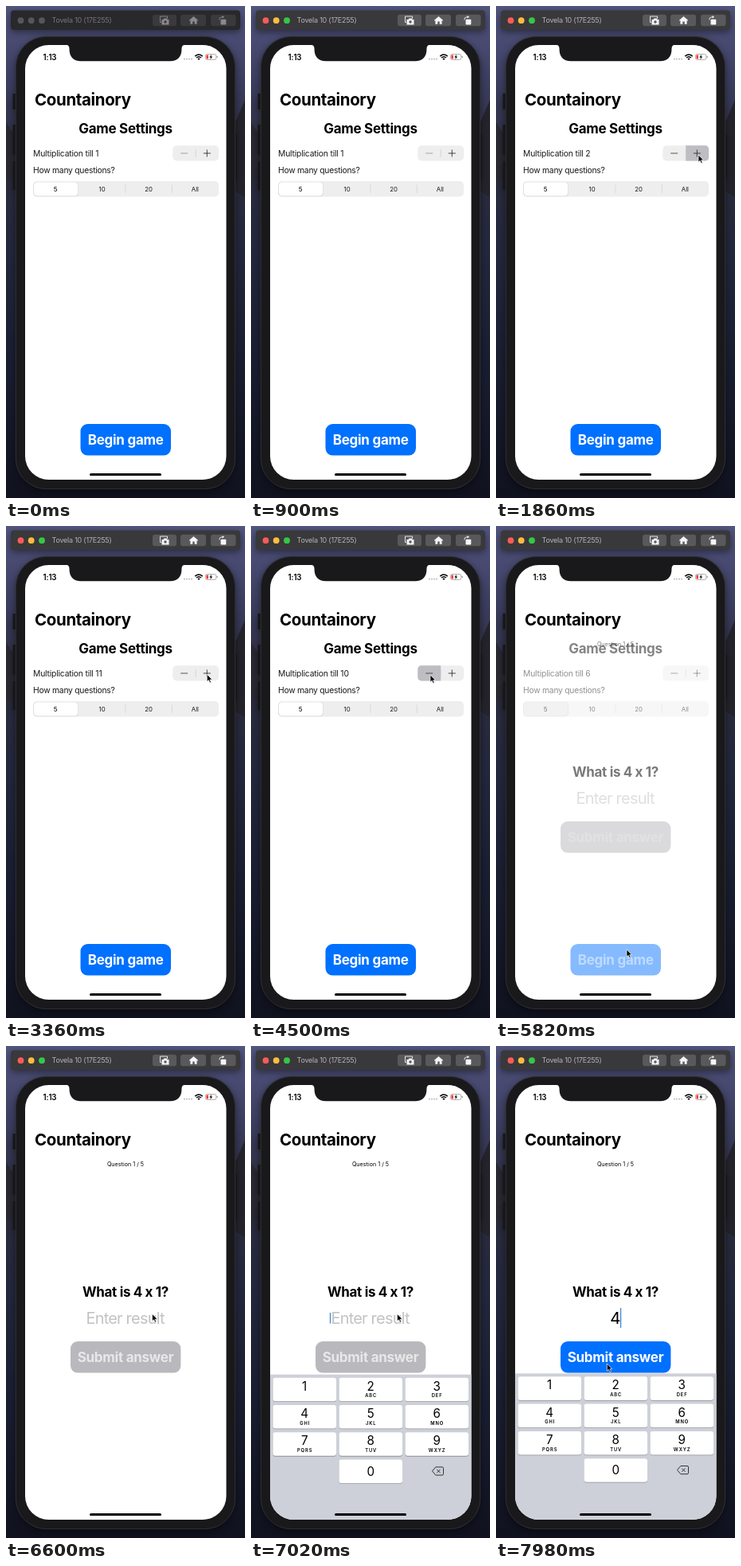
An HTML page that plays this animation: 300 px wide and 618 px high, repeating every 8 s.

```html
<!DOCTYPE html>
<html lang="en">
<head>
<meta charset="utf-8">
<title>Times table game</title>
<style>
html, body { margin: 0; width: 100%; height: 100%; overflow: hidden; background: #171a27; }
svg { display: block; width: 100%; height: 100%; }
text { font-family: Inter, sans-serif; white-space: pre; }
.window { filter: drop-shadow(0 3px 5px rgba(0, 0, 0, .45)); }
</style>
</head>
<body>
<svg id="stage" viewBox="0 0 300 618" preserveAspectRatio="none"></svg>
<script>
const LOOP = 8000;
const BLUE = '#0070ff';
const INK = '#1a1a1c';
const stage = document.getElementById('stage');

const rect = (x, y, w, h, r, fill, more = '') =>
  `<rect x="${x}" y="${y}" width="${w}" height="${h}" rx="${r}" fill="${fill}" ${more}/>`;
const line = (d, color, width = 0.9, more = '') =>
  `<path d="${d}" fill="none" stroke="${color}" stroke-width="${width}" ${more}/>`;
const text = (x, y, size, str, more = '', weight = 400, gap = -0.015) =>
  `<text x="${x}" y="${y}" font-size="${size}" font-weight="${weight}" letter-spacing="${(size * gap).toFixed(3)}" ${more}>${str}</text>`;
const mid = (x, y, size, str, more = '', weight = 400, gap = -0.015) =>
  text(x, y, size, str, `text-anchor="middle" ${more}`, weight, gap);
const fade = (cls, items) => `<g class="${cls}">${items.join('')}</g>`;

function wallpaper() {
  const stops = [[0, '#53567f'], [0.06, '#4a4c74'], [0.15, '#3d3f62'], [0.23, '#34354e'],
    [0.36, '#2a2c3e'], [0.5, '#24283e'], [0.75, '#191d30'], [1, '#10121f']];
  return `<defs>
    <linearGradient id="sky" x2="0" y2="1">${stops.map(([o, c]) => `<stop offset="${o}" stop-color="${c}"/>`).join('')}</linearGradient>
    <clipPath id="glass"><rect x="24" y="49" width="252.5" height="546" rx="29.5"/></clipPath>
  </defs>${rect(0, 0, 300, 618, 0, 'url(#sky)')}
  <path d="M300 118L286 150V232L300 240Z" fill="#25242d"/><path d="M0 146L14 168V216L0 220Z" fill="#2b2932"/>`;
}

function titleBar() {
  const lights = [18.5, 31.7, 45].map(x => `<circle class="light" cx="${x}" cy="18.2" r="3.9"/>`).join('');
  const buttons = [[184, 30], [219, 32], [257, 31.5]]
    .map(([x, w]) => rect(x, 10.8, w, 14.4, 3, '', 'class="tool"')).join('');
  const camera = line('M195 20.500h-1.500v-7.500h9v3', 'currentColor', 0.9) +
    `<path d="M195.5 17h2l1-1.500h3l1 1.500h2v6.500h-9z" fill="currentColor"/><circle class="hole" cx="200" cy="20" r="1.700"/>`;
  const home = `<path d="M235.500 12.900l5.700 5-.7.800-.9-.7v4.700h-2.900v-3.300h-2.400v3.300h-2.900v-4.700l-.9.700-.7-.8z" fill="currentColor"/>`;
  const turn = rect(269.5, 16.8, 6.8, 6.6, 1, 'currentColor') +
    line('M267.800 17.500q-.2-3.600 3.200-3.700h1', 'currentColor', 0.9) + '<path d="M271.500 12l2.600 1.800-2.600 1.800z" fill="currentColor"/>';
  return rect(6, 5.5, 288, 24.5, 4, '', 'id="bar" class="window"') + lights +
    text(57.5, 21.4, 9, 'Tovela 10 (17E255)', 'id="barText"', 400, -0.025) +
    buttons + `<g id="tools">${camera}${home}${turn}</g>`;
}

function phone() {
  const keys = [[110, 20], [149, 38], [195, 36]].map(([y, h]) => rect(8.5, y, 5, h, 1, '#17171b')).join('');
  return `<g class="window">${keys}${rect(285, 160, 5, 58, 1, '#17171b')}` +
    rect(12.4, 38.4, 275.2, 568.2, 38, '#19181a', 'stroke="#313033" stroke-width="1"') + '</g>' +
    rect(24, 49, 252.5, 546, 29.5, '#fff');
}

function statusBar() {
  const dots = [224, 227, 230, 233].map(x => `<circle cx="${x}" cy="66.6" r="0.9" fill="#aaa"/>`).join('');
  const wifi = line('M237.3 63.1q4.7-4.2 9.4 0', '#000', 1.5) + line('M239 65q3-2.6 6 0', '#000', 1.4) +
    '<path d="M240.4 66.2q1.6-1.2 3.2 0l-1.6 1.7z"/>';
  const battery = rect(250.4, 60.6, 13.4, 6.8, 2, 'none', 'stroke="#8c8c8c" stroke-width=".7"') +
    rect(251.4, 61.6, 2.6, 4.8, 0.8, '#ff3b30') + rect(264.7, 62.8, 0.9, 2.4, 0.4, '#8c8c8c') +
    '<path d="M258 60.8l-2.7 3.6h1.7l-.6 2.8 2.7-3.6h-1.7z"/>';
  return '<path d="M75 48.500Q79.500 49 79.500 53.500C79.500 64 84.500 69.300 94 69.300H206C215.500 69.300 220.500 64 220.500 53.500Q220.500 49 225 48.500Z" fill="#19181a"/>' +
    text(46.5, 67.5, 9.7, '1:13', '', 600) + dots + wifi + battery;
}

function settings() {
  const segments = ['5', '10', '20', 'All'].map((s, i) =>
    mid(62.2 + i * 58.4, 232.6, 7.8, s, `fill="${INK}"`, i ? 400 : 500, 0));
  return fade('out', [
    mid(150, 160.2, 17, 'Game Settings', '', 700, -0.018),
    text(34, 188.6, 10.35, '', `id="till" fill="${INK}"`, 400, -0.018),
    text(34, 209.5, 10.35, 'How many questions?', `fill="${INK}"`, 400, -0.025),
    rect(209.3, 175.3, 57.8, 19.2, 5, '#eeeeef'),
    '<path id="minusBg" d="M238.2 175.3h-23.900q-5 0-5 5v9.200q0 5 5 5h23.900z" fill="#bdbdc2"/>',
    '<path id="plusBg" d="M238.2 175.3h23.900q5 0 5 5v9.200q0 5-5 5h-23.900z" fill="#bdbdc2"/>',
    line('M238.2 180v9.800', '#cfcfd2', 0.8),
    line('M219.200 185h9', '#000', 0.9, 'id="minus"'),
    line('M247.800 185h9M252.300 180.500v9', '#000', 0.9, 'id="plus"'),
    rect(34, 220, 233, 19.5, 5, '#eeeeef'),
    rect(34.3, 220.9, 56.6, 18.3, 4.4, '#d4d4d7'),
    rect(34.9, 221.2, 55.4, 17.2, 4.2, '#fff'),
    line('M150 224.500v10.500M208.300 224.500v10.500', '#d3d3d6', 0.7),
    ...segments,
    rect(93.5, 525, 113.5, 39.6, 9, BLUE),
    mid(150.2, 550.6, 17, 'Begin game', 'fill="#fff"', 700)
  ]);
}

function game() {
  return fade('in', [
    mid(150, 151.2, 7.2, 'Question 1 / 5', '', 400, 0),
    mid(150, 314.5, 17, 'What is 4 x 1?', '', 700, -0.02),
    mid(149.6, 349, 20, 'Enter result', 'id="hint" fill="#c3c3c6"', 400, -0.04),
    mid(149.8, 349, 20.5, '4', 'id="typed"', 400, 0),
    rect(81, 371, 138.4, 39.6, 9, BLUE, 'id="submit"'),
    mid(150, 396.8, 17, 'Submit answer', 'id="submitText"', 700)
  ]) + rect(98.9, 335, 1.2, 13.5, 0.3, '#3b82d8', 'id="caret"');
}

function keyboard() {
  const letters = ['', 'ABC', 'DEF', 'GHI', 'JKL', 'MNO', 'PQRS', 'TUV', 'WXYZ'];
  const key = (x, y, digit, sub) => rect(x, y + 0.8, 79.5, 29.6, 3, '#8e9197') +
    rect(x, y, 79.5, 29.6, 3, '#fff', `id="key${digit}"`) +
    mid(x + 39.7, y + (digit ? 16 : 20), 15.2, digit, '', 400, 0) +
    (sub ? mid(x + 40.2, y + 24.7, 5.8, sub, '', 600, 0.16) : '');
  const keys = letters.map((sub, i) =>
    key(27.5 + (i % 3) * 83, 415.3 + Math.floor(i / 3) * 34.3, i + 1, sub)).join('');
  const erase = line('M231.800 527.500h8.200q1.500 0 1.500 1.500v7.200q0 1.500-1.500 1.500h-8.200l-4.300-5.100zM233.300 530.500l4.300 4.300m0-4.300l-4.300 4.300',
    '#222', 0.9, 'stroke-linejoin="round"');
  return `<g id="keyboard">${rect(24, 411.3, 253, 190, 0, '#cdd0d8')}${keys}${key(110.5, 518.2, 0, '')}${erase}</g>`;
}

stage.innerHTML = wallpaper() + titleBar() + phone() +
  `<g clip-path="url(#glass)">${text(36, 124.6, 20.5, 'Countainory', '', 700, -0.018)}${settings()}${game()}${keyboard()}
   ${rect(105, 586.9, 90, 3, 1.5, '#000')}</g>` + statusBar() +
  '<path id="cursor" d="M0 0V9.200L2.100 7.300L3.600 10.600L5.200 9.900L3.700 6.700H6.600Z" fill="#000" stroke="#fff" stroke-width=".7" stroke-linejoin="round"/>';

const $ = id => document.getElementById(id);
const each = (sel, fn) => stage.querySelectorAll(sel).forEach(fn);
const set = (id, name, value) => $(id).setAttribute(name, value);
const show = (id, on) => set(id, 'visibility', on ? 'visible' : 'hidden');
const clamp = v => Math.max(0, Math.min(1, v));
const smooth = v => { v = clamp(v); return v * v * (3 - 2 * v); };

const PLUS = { start: 1800, gap: 165, count: 11, hold: 72 };
const MINUS = { start: 4280, gap: 180, count: 6, hold: 85 };
const clicks = (c, t) => t < c.start ? 0 : Math.min(c.count, 1 + Math.floor((t - c.start) / c.gap));
const pressed = (c, t) => {
  const n = clicks(c, t);
  return n > 0 && t - c.start - (n - 1) * c.gap < c.hold;
};

// Pointer stops: time, x, y
const route = [[750, 312, 300], [1500, 254, 187], [1900, 254, 187], [3300, 252.3, 186.3], [3600, 252.3, 186.3],
  [4100, 225, 187], [5270, 225, 187], [5600, 164, 532], [6050, 164, 532], [6520, 183.5, 336.5],
  [7080, 183.5, 336.5], [7520, 72, 464], [7680, 72, 464], [7960, 139.3, 399]];

function pointer(t) {
  let i = 0;
  while (i < route.length - 2 && t > route[i + 1][0]) i++;
  const [a, b] = [route[i], route[i + 1]];
  const k = smooth((t - a[0]) / (b[0] - a[0]));
  return [a[1] + (b[1] - a[1]) * k, a[2] + (b[2] - a[2]) * k];
}

function draw(t) {
  const active = t >= 500;
  const colors = ['#fc5b57', '#fdbc40', '#34c749'];
  each('.light', (el, i) => el.setAttribute('fill', active ? colors[i] : '#565558'));
  each('.tool, .hole', el => el.setAttribute('fill', active ? '#59585b' : '#3a393c'));
  set('bar', 'fill', active ? '#39383b' : '#29282b');
  set('barText', 'fill', active ? '#b4b3b6' : '#757477');
  set('tools', 'color', active ? '#f5f5f5' : '#89888b');

  const value = 1 + clicks(PLUS, t) - clicks(MINUS, t);
  $('till').textContent = 'Multiplication till ' + value;
  show('plusBg', pressed(PLUS, t));
  show('minusBg', pressed(MINUS, t));
  set('minus', 'stroke', value > 1 ? '#444' : '#999');
  set('plus', 'stroke', value < 12 ? '#333' : '#999');

  const p = smooth((t - 5636) / 360);
  each('.out > *', el => el.setAttribute('opacity', 1 - p));
  each('.in > *', el => el.setAttribute('opacity', p));

  const typed = t >= 7660;
  show('hint', !typed);
  show('typed', typed);
  set('submit', 'fill', typed ? BLUE : '#b9b9bd');
  set('submitText', 'fill', typed ? '#fff' : '#e8e8ea');
  show('caret', typed || (t > 6640 && (t - 6640) % 1000 < 620));
  set('caret', 'x', typed ? 156 : 98.9);
  set('caret', 'y', typed ? 329 : 335);
  set('caret', 'height', typed ? 25 : 13.5);

  // Critically damped slide
  const w = Math.max(0, t - 6710) * 0.0225;
  set('keyboard', 'transform', `translate(0 ${186 * (1 + w) * Math.exp(-w)})`);
  set('key4', 'fill', t >= 7570 && t < 7660 ? '#b4b9c3' : '#fff');

  set('cursor', 'transform', `translate(${pointer(t).join(' ')})`);
}

const began = performance.now();
function tick() {
  draw((performance.now() - began) % LOOP);
  requestAnimationFrame(tick);
}
tick();
</script>
</body>
</html>
```
